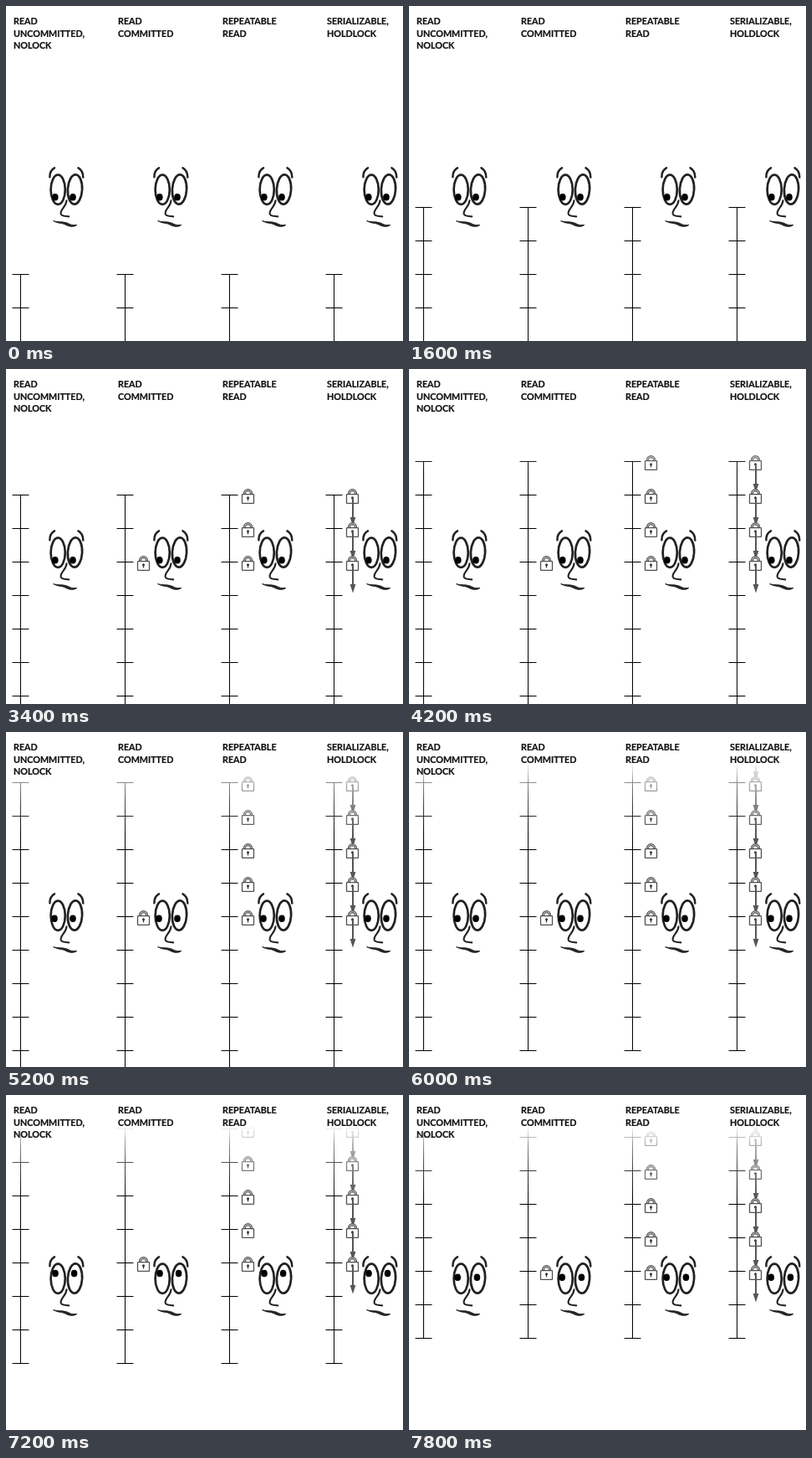
These frames come from a looping animation (475x400 px, 8000 ms). An HTML page:

```html
<!DOCTYPE html>
<html lang="en">
<head>
<meta charset="utf-8">
<title>Isolation levels and locks</title>
<style>
  html, body { margin: 0; width: 100%; height: 100%; overflow: hidden; background: #fff; }
  svg { display: block; }
  text { font: bold 10.75px Lato, Carlito, sans-serif; fill: #111; stroke: #111; stroke-width: .2px; }
</style>
</head>
<body>
<svg id="stage" width="475" height="400" viewBox="0 0 475 400">
  <defs>
    <linearGradient id="fade" gradientUnits="userSpaceOnUse" x1="0" y1="36" x2="0" y2="124">
      <stop offset="0" stop-color="#fff"/>
      <stop offset=".27" stop-color="#fff" stop-opacity=".56"/>
      <stop offset=".55" stop-color="#fff" stop-opacity=".28"/>
      <stop offset="1" stop-color="#fff" stop-opacity="0"/>
    </linearGradient>
    <g id="lock">
      <path d="M-4 0V-1.4a4 4 0 0 1 8 0V0" fill="none" stroke="#555" stroke-width="3.2"/>
      <path d="M-4 0V-1.4a4 4 0 0 1 8 0V0" fill="none" stroke="#ccc" stroke-width="1"/>
      <rect x="-7" y="-.4" width="14" height="10.8" rx=".6" fill="#fff" stroke="#505050" stroke-width="1.3"/>
      <circle cy="3.8" r="1.5" fill="#333"/>
      <path d="M0 4V7.4" stroke="#333" stroke-width="1.3"/>
    </g>
    <g id="arrow" fill="#555">
      <rect x="-1" y="4" width="2" height="24"/>
      <path d="M-3.4 27H3.4L0 37.5Z"/>
    </g>
    <g id="face" fill="none" stroke="#222" stroke-linecap="round">
      <g stroke-width="2.7">
        <ellipse cx="62.2" cy="219.3" rx="8.6" ry="17.6"/>
        <ellipse cx="82.5" cy="219" rx="8.6" ry="17.6" transform="rotate(3 82.5 219)"/>
      </g>
      <path d="M52.4 204.2Q52.2 196.5 58 193.4M86.5 193.4Q92.3 196.5 92.3 204.6" stroke-width="2.5"/>
      <path d="M72.5 232.3C71.8 240 65 242.5 65.6 248C66 251.5 71 250.6 75.2 251.4" stroke-width="2.1"/>
      <path d="M57 256.8C64 258.4 70 256.8 76 260.4C79 262 82 261.4 84.8 261.4C81 264.6 75 263.4 71 261C67 258.8 62 260 57 256.8Z" fill="#222" stroke-width=".9"/>
    </g>
  </defs>
</svg>
<script>
const NS = "http://www.w3.org/2000/svg";
const STEP_MS = 200, STEPS = 40, ROW = 40, ROWS = 10, COLUMN = 125;
const LABELS = [
  ["READ", "UNCOMMITTED,", "NOLOCK"],
  ["READ", "COMMITTED"],
  ["REPEATABLE", "READ"],
  ["SERIALIZABLE,", "HOLDLOCK"]
];
// Pupil x for the left and right eye, and their y, as the row being read rises.
const GAZE = [[58.8, 80, 228.2], [58, 80, 222.8], [58.2, 81.4, 217.8], [59, 81.6, 213]];

function add(parent, tag, attrs = {}) {
  const node = document.createElementNS(NS, tag);
  for (const name in attrs) node.setAttribute(name, attrs[name]);
  return parent.appendChild(node);
}

function makeColumn(lines, index) {
  const root = add(stage, "g", { transform: `translate(${index * COLUMN})` });
  const moving = add(root, "g");
  add(moving, "rect", { x: 17, y: 0, width: 1, height: ROW * (ROWS - 1) });
  for (let row = 0; row < ROWS; row++)
    add(moving, "rect", { x: 7.5, y: row * ROW, width: 20, height: 1 });

  const locks = [];
  for (let row = 0; index > 0 && row < ROWS; row++) {
    const lock = add(moving, "g", { transform: `translate(39.5 ${row * ROW})` });
    add(lock, "use", { href: "#lock" });
    if (index === 3) add(lock, "use", { href: "#arrow", x: 0.5 });
    locks.push(lock);
  }

  add(root, "rect", { width: COLUMN, height: 124, fill: "url(#fade)" });
  add(root, "use", { href: "#face" });
  const pupils = [0, 1].map(() => add(root, "ellipse", { rx: 3.8, ry: 4.3 }));
  lines.forEach((line, i) => {
    add(root, "text", { x: 9, y: 22 + i * 14.6 }).textContent = line;
  });
  return { index, moving, locks, pupils };
}

const stage = document.getElementById("stage");
const columns = LABELS.map(makeColumn);

function draw(step) {
  const top = 320 - step * 10;
  const current = Math.floor((step - 9) / 4);
  const gaze = GAZE[step < 9 ? 0 : (step - 9) % 4];
  for (const { index, moving, locks, pupils } of columns) {
    moving.setAttribute("transform", `translate(0 ${top})`);
    locks.forEach((lock, row) => {
      const held = index === 1 ? row === current : row <= current;
      lock.setAttribute("visibility", held ? "visible" : "hidden");
    });
    pupils.forEach((pupil, side) => {
      pupil.setAttribute("cx", gaze[side]);
      pupil.setAttribute("cy", gaze[2]);
    });
  }
}

const start = performance.now();
function tick() {
  draw(Math.floor((performance.now() - start) / STEP_MS) % STEPS);
  requestAnimationFrame(tick);
}
tick();
</script>
</body>
</html>
```
